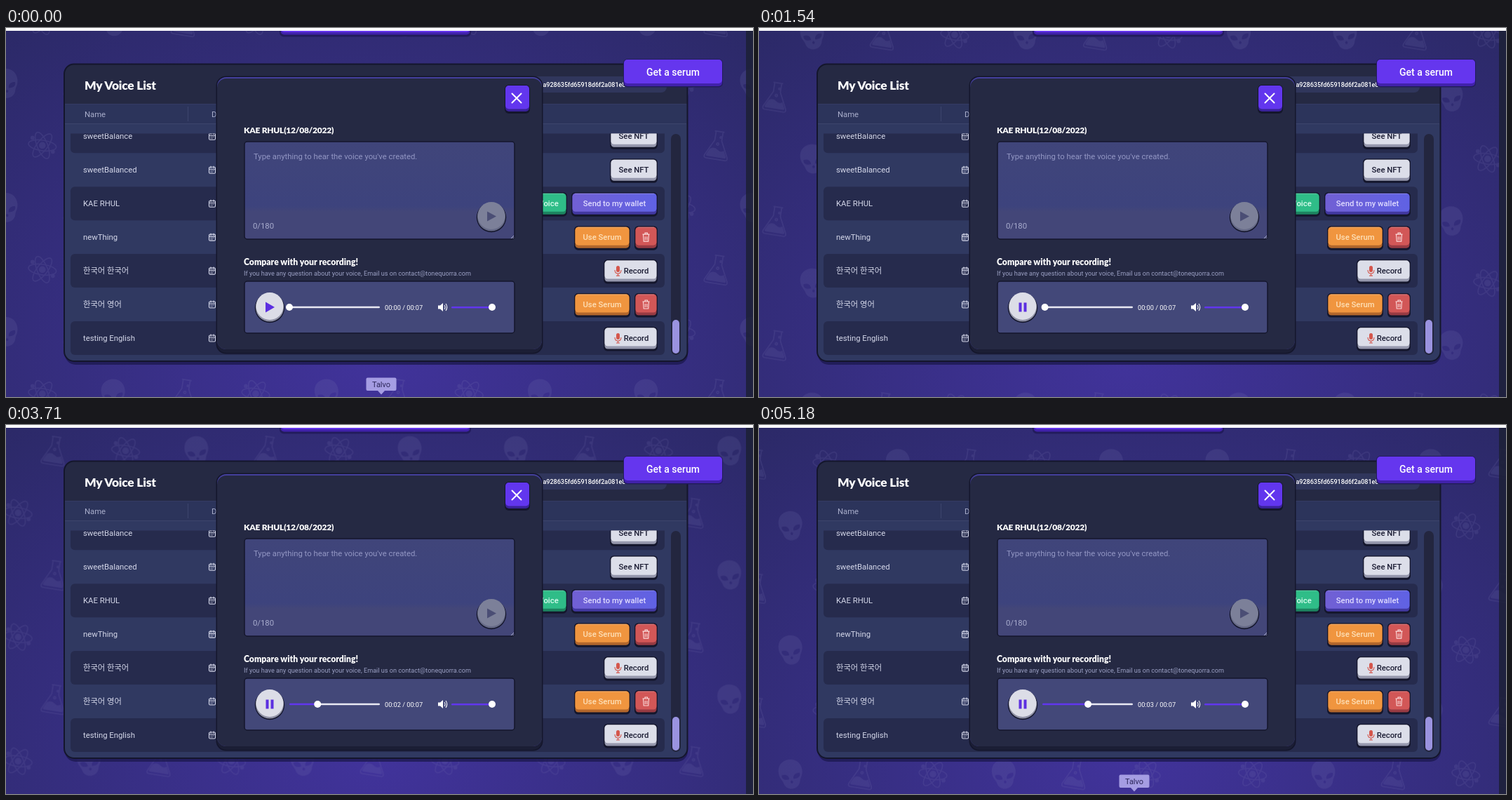
An HTML page for the animation above (5250 ms loop, 1065 by 526 pixels).

```html
<!DOCTYPE html>
<html lang="en">
<head>
<meta charset="utf-8">
<title>Voice list</title>
<style>
html, body { margin: 0; width: 100%; height: 100%; overflow: hidden; background: #2d2a6a; }
svg { display: block; width: 100%; height: 100%; }
text { font-family: Roboto, "Noto Sans CJK KR", "Noto Sans CJK", sans-serif; font-size: 11.3px; }
.title { font-family: Lato, Roboto, sans-serif; font-weight: 900; fill: #fff; }
</style>
</head>
<body>
<svg id="stage" viewBox="0 0 1065 526" xmlns="http://www.w3.org/2000/svg"></svg>
<script>
const LOOP = 5250, STEP = 70;
const PLAY_AT = 1330, TRACK_X = 404, TRACK_W = 129, TRACK_SPEED = 16.9;
const TIP_OFF = 560, TIP_ON = 3850;
const INK = '#14162c';

const rect = (x, y, w, h, fill, rx = 0, extra = '') =>
  `<rect x="${x}" y="${y}" width="${w}" height="${h}" rx="${rx}" fill="${fill}" ${extra}/>`;
const circle = (x, y, r, fill, extra = '') =>
  `<circle cx="${x}" cy="${y}" r="${r}" fill="${fill}" ${extra}/>`;
const path = (d, fill, extra = '') => `<path d="${d}" fill="${fill}" ${extra}/>`;
const line = (d, color, width, extra = '') =>
  path(d, 'none', `stroke="${color}" stroke-width="${width}" ${extra}`);
const text = (x, y, s, fill, extra = '') => `<text x="${x}" y="${y}" fill="${fill}" ${extra}>${s}</text>`;
const size = n => `style="font-size:${n}px"`;

function button(x, y, w, h, fill, lip, label = '', color = '#1b1c33', tx = x + w / 2) {
  return rect(x - 1, y - 1, w + 2, h + 4.5, INK, 5.5) +
    rect(x + .5, y + .5, w - 1, h, lip, 4.5) +
    rect(x + .5, y + .5, w - 1, h - 4, fill, 4.5) +
    line(`M${x + 4} ${y + 1}h${w - 8}`, '#fff', 1, 'opacity=".25"') +
    text(tx, y + h / 2 + 4, label, color, 'text-anchor="middle" font-weight="500"');
}

const SHAPES = `
<g id="skull" transform="rotate(-8)">
  <path fill-rule="evenodd" fill="#827db8" d="M0-21C11-21 17-13 17-4C17 4 13 7 12 11C11 17 6 21 0 21
    S-11 17-12 11C-13 7-17 4-17-4C-17-13-11-21 0-21Z
    M-13 0C-14 6-8 8-3 7C-3 1-8-1-13 0Z M13 0C14 6 8 8 3 7C3 1 8-1 13 0Z
    M-2 11L0 9L2 11L1 13H-1Z"/>
</g>
<g id="flask" transform="rotate(9)" stroke="#827db8" stroke-width="1.8" fill="none" stroke-linejoin="round">
  <path d="M-7-20H7M-5-20V-7L-16 15Q-18 20-13 20H13Q18 20 16 15L5-7V-20"/>
  <path d="M-10 6Q-4 2 1 6T10 6L14 14Q15 17 12 17H-12Q-15 17-14 14Z" fill="#827db8" stroke="none"/>
  <circle cx="0" cy="-2" r="1.6"/><circle cx="3" cy="-12" r="1.2"/>
</g>
<g id="atom" stroke="#827db8" stroke-width="1.7" fill="none">
  ${[8, 68, 128].map(a => `<ellipse rx="20" ry="7.5" transform="rotate(${a})"/>`).join('')}
  <circle r="4" fill="#827db8"/>
  <circle cx="-14" cy="-11" r="2" fill="#827db8"/><circle cx="15" cy="9" r="2" fill="#827db8"/>
</g>`;

// Ten shapes per row; each row repeats one tile width later.
function pattern() {
  const kinds = ['skull', 'flask', 'atom'];
  let out = '';
  for (let row = 0; row < 7; row++) {
    const odd = row % 2;
    for (let i = 0; i < 20; i++) {
      const k = i % 10;
      const x = (odd ? -101.4 : -151) + 101.4 * k + (i > 9 ? 1064 : 0);
      out += `<use href="#${kinds[(k + odd * 2) % 3]}" transform="translate(${x} ${-9.6 + 88.5 * row})"/>`;
    }
  }
  return out;
}

const calendar = y => `<g transform="translate(289 ${y - 5})" fill="none" stroke="#d5d8ea" stroke-width="1.1">
  <rect x=".5" y="1" width="9" height="9" rx="1.5"/><path d="M.5 4H9.5M3-.5V2.5M7-.5V2.5M2.5 6h1M4.5 6h1M6.5 6h1M2.5 8h1M4.5 8h1"/></g>`;

const seeNft = y => button(862, y - 15, 66, 30, '#dcdee9', '#9698ad', 'See NFT');
const record = y => button(853, y - 15, 75, 30, '#dcdee9', '#9698ad', 'Record', '#1b1c33', 898.5) +
  rect(870, y - 7, 5, 9, '#d4564c', 2.5) +
  line(`M868 ${y - 1}q0 5 4.5 5t4.5-5M872.5 ${y + 4}v3M870 ${y + 7}h5`, '#d4564c', 1.1);
const serum = y => button(811, y - 15, 78, 30, '#f0953f', '#b3672c', 'Use Serum', '#fde0b8') +
  button(897, y - 15, 31, 30, '#d25757', '#983b43') +
  line(`M907.5 ${y - 4}h10M911 ${y - 4}v-2h3.5v2M908.5 ${y - 4}l.7 10h6.6l.7-10M911.3 ${y - 1}v5M913.8 ${y - 1}v5`, '#fbdcdc', 1.1);
const minted = y => button(726, y - 15, 73, 30, '#2fbd88', '#1d8460', 'Use Voice', '#d9fbee') +
  button(807, y - 15, 121, 30, 'url(#violet)', '#4238a0', 'Send to my wallet', '#e0dcff');

const ROWS = [
  ['sweetBalance', seeNft], ['sweetBalanced', seeNft], ['KAE RHUL', minted], ['newThing', serum],
  ['한국어 한국어', record], ['한국어 영어', serum], ['testing English', record]
];

function rows() {
  return ROWS.map(([name, actions], i) => {
    const y = 154.3 + 47.95 * i;
    return (i % 2 ? '' : rect(92, y - 24, 847, 48, '#262b4d', 6)) +
      text(110, y + 4, name, '#d5d8ea') + calendar(y) + actions(y);
  }).join('');
}

function panel() {
  return rect(84, 60, 888, 420, '#1d1a50', 15, 'opacity=".8"') +
    rect(83, 51.5, 888.5, 423.5, '#303961', 14) +
    path('M83 108V65.5Q83 51.5 97 51.5H957.5Q971.5 51.5 971.5 65.5V108Z', '#252943') +
    rect(83, 108, 888, 28, '#2c345b') +
    line('M84 108.5H970', '#343b64', 1) + line('M84 136.5H970M259.5 112V133', '#3c446c', 1) +
    rect(83, 51.5, 888.5, 423.5, 'none', 14, `stroke="${INK}" stroke-width="2"`) +
    text(112, 87.5, 'My Voice List', '#fff', 'class="title" style="font-size:17.4px;letter-spacing:-.2px"') +
    text(112, 127, 'Name', '#a9aecb') + text(293, 127, 'Date', '#a9aecb') +
    rect(700, 69, 242, 23, '#30365c', 8) +
    text(765.5, 83.5, 'a928635fd65918d6f2a081e8', '#fff', 'font-weight="500" style="font-size:9px"') +
    `<g clip-path="url(#list)">${rows()}</g>` +
    rect(948, 151, 14, 315, '#23263f', 7) + rect(950, 416, 10, 48, '#9a93e0', 5);
}

const roundButton = (x, y, fill, lip) =>
  circle(x, y + 2, 21.2, INK) + circle(x, y + 1.5, 20, lip) + circle(x, y - .5, 19.5, fill);

function dialog() {
  return rect(299.5, 68.5, 466, 396, INK, 14) +
    rect(301, 70, 463, 393, '#1b1e35', 13) +
    rect(301, 70, 463, 388, '#443f9c', 13) +
    rect(301, 72, 463, 386, '#252943', 13) +
    rect(711, 81, 36, 41, INK, 6) + rect(712, 82, 34, 37, '#3a229a', 5) +
    rect(712, 82, 34, 33.5, '#6236ee', 5) +
    line('M721.5 93.5l13 13M734.5 93.5l-13 13', '#fff', 2, 'stroke-linecap="round"') +
    text(339, 149.5, 'KAE RHUL(12/08/2022)', '#fff', 'class="title" style="font-size:12px;letter-spacing:-.25px"') +
    rect(340, 162, 385, 139, 'url(#field)', 4, `stroke="${INK}" stroke-width="1.5"`) +
    text(353, 187, "Type anything to hear the voice you've created.", '#9397c4') +
    text(352, 285.5, '0/180', '#a9adce') +
    roundButton(692, 268, '#7c8099', '#666a87') +
    path('M686 261.5L699 268.5L686 275.5Z', '#4b4e75') +
    line('M720 300l4-4M722.5 300l1.5-1.5', '#c8cae0', .8) +
    text(339, 338, 'Compare with your recording!', '#fff', 'class="title" style="font-size:12.2px"') +
    text(339, 352.5, 'If you have any question about your voice, Email us on contact@tonequorra.com', '#9ba0c4', size(9.15)) +
    rect(340, 361, 385, 74, '#434879', 4, `stroke="${INK}" stroke-width="1.5"`) +
    roundButton(376, 397, '#dcdde7', '#9092a6') +
    path('M370 390.5L383 398L370 405.5Z', '#5c2fe0', 'id="play"') +
    path('M370.5 391.5h4v13h-4zM377.5 391.5h4v13h-4z', '#5c2fe0', 'id="pause"') +
    rect(TRACK_X, 396.7, TRACK_W, 2.6, '#e9e9f3', 1.3, 'id="rest"') +
    rect(TRACK_X, 396.7, 0, 2.6, '#6236ee', 1.3, 'id="bar"') +
    circle(TRACK_X, 398, 5, '#fff', 'id="knob"') +
    text(540, 401.5, '', '#fff', `id="clock" ${size(9.2)}`) +
    path('M616 395.5h3l4-3.5v12l-4-3.5h-3z', '#fff') +
    line('M625 395q2.2 3 0 6M627 393q3.5 5 0 10', '#fff', 1.1) +
    rect(635, 397, 58, 2.6, '#6236ee', 1.3) + circle(693, 398, 5, '#fff');
}

document.getElementById('stage').innerHTML = `
<defs>
  <radialGradient id="sky" gradientUnits="userSpaceOnUse" cx="0" cy="0" r="1"
    gradientTransform="translate(530 470) scale(840 640)">
    <stop offset="0" stop-color="#41339b"/><stop offset="1" stop-color="#2b2966"/>
  </radialGradient>
  <linearGradient id="violet"><stop offset="0" stop-color="#7160d4"/><stop offset="1" stop-color="#6062e4"/></linearGradient>
  <linearGradient id="field" x2="0" y2="1"><stop offset="0" stop-color="#40457a"/>
    <stop offset=".66" stop-color="#3d437d"/><stop offset=".72" stop-color="#434678"/></linearGradient>
  <clipPath id="list"><rect x="84" y="150.5" width="860" height="315.5"/></clipPath>
  ${SHAPES}
</defs>
${rect(0, 0, 1065, 526, 'url(#sky)')}
<g id="drift" opacity=".16">${pattern()}</g>
${rect(1055, 0, 10, 526, '#1d2036', 0, 'opacity=".85"')}
${rect(390, -20, 273, 32.5, '#221c5c', 6) + rect(391.5, -20, 270, 29.5, '#4122ac', 5) + rect(391.5, -20, 270, 26, '#6536ee', 5)}
${rect(0, 0, 1065, 4, '#fff')}
${panel()}
${dialog()}
${rect(880, 44, 142, 40.5, '#221c5c', 6) + rect(881, 45, 140, 38, '#4122ac', 5) + rect(881, 45, 140, 34, '#6536ee', 5)}
${text(951, 68, 'Get a serum', '#fff', `text-anchor="middle" font-weight="500" ${size(14)}`)}
<g id="tip">
  ${rect(513.5, 498.5, 43, 18.5, '#a59de3', 2) + path('M530 517h10l-5 5.5z', '#a59de3')}
  ${text(535, 511.5, 'Talvo', '#2a2558', `text-anchor="middle" ${size(11)}`)}
</g>`;

const ids = ['drift', 'tip', 'play', 'pause', 'rest', 'bar', 'knob', 'clock'];
const parts = Object.fromEntries(ids.map(id => [id, document.getElementById(id)]));
const show = (node, on) => node.setAttribute('visibility', on ? 'visible' : 'hidden');

function draw(ms) {
  const t = Math.floor((ms % LOOP) / STEP) * STEP;
  const playing = t >= PLAY_AT;
  const played = playing ? (t - PLAY_AT) / 1000 : 0;
  const x = played * TRACK_SPEED;
  parts.drift.setAttribute('transform', `translate(${-0.05 * t} ${0.0125 * t})`);
  show(parts.tip, t < TIP_OFF || t >= TIP_ON);
  show(parts.play, !playing);
  show(parts.pause, playing);
  parts.bar.setAttribute('width', x);
  parts.rest.setAttribute('x', TRACK_X + x);
  parts.rest.setAttribute('width', TRACK_W - x);
  parts.knob.setAttribute('cx', TRACK_X + x);
  parts.clock.textContent = `00:0${Math.floor(played)} / 00:07`;
}

const start = performance.now();
function tick() {
  draw(performance.now() - start);
  requestAnimationFrame(tick);
}
tick();
</script>
</body>
</html>
```
